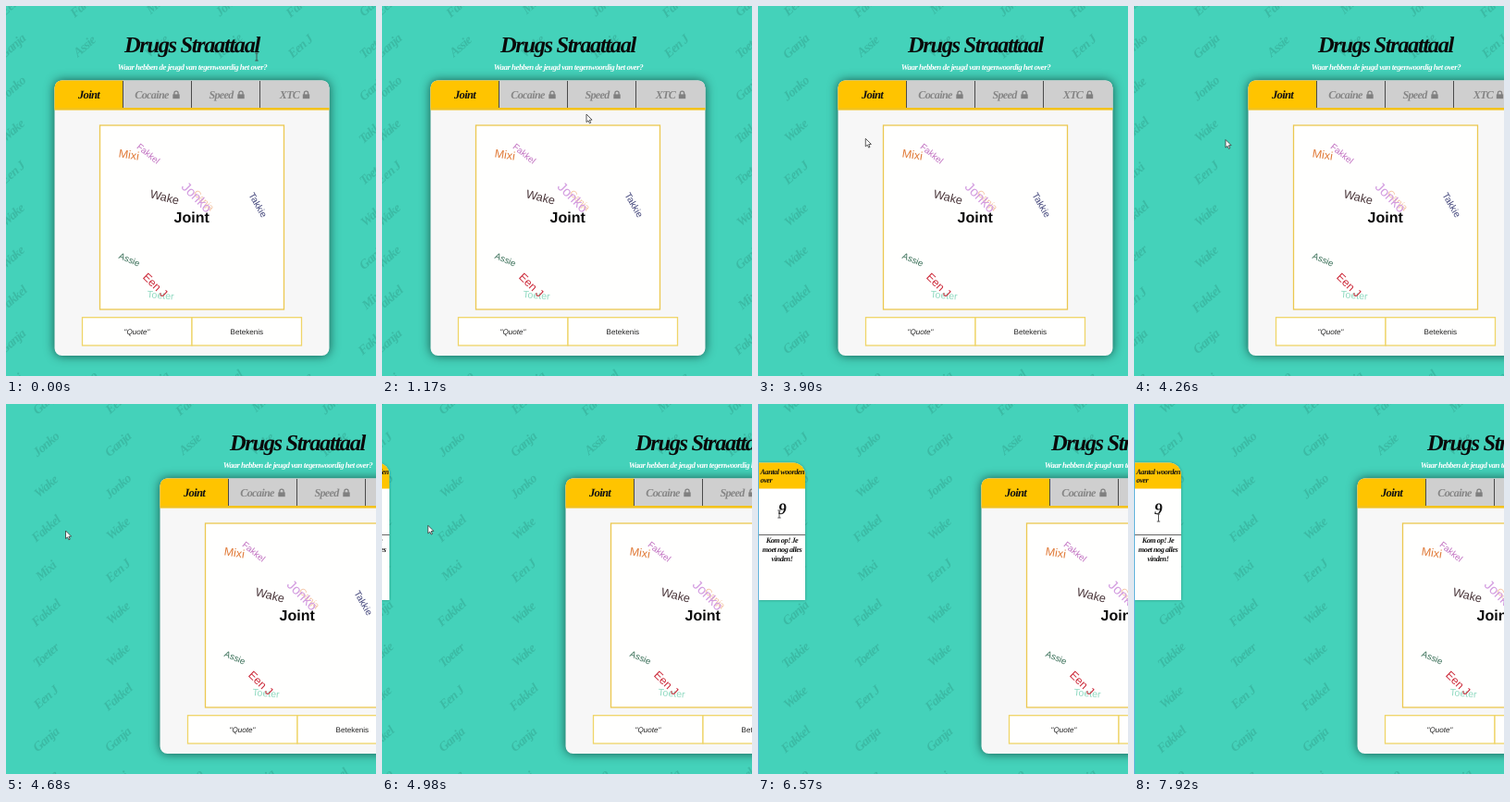
An HTML page with a canvas for the animation above (8000 ms loop, 400x400 px).

```html
<!DOCTYPE html>
<html lang="nl">
<head>
<meta charset="utf-8">
<title>Drugs Straattaal</title>
<style>
html, body { margin: 0; width: 100%; height: 100%; overflow: hidden; background: #44d2ba; }
canvas { display: block; width: 100vw; height: 100vh; }
</style>
</head>
<body>
<canvas id="stage"></canvas>
<script>
const LOOP = 8000, SIZE = 400;
const SCRIPT = "'Liberation Serif', serif";
const SANS = "'Liberation Sans', Arial, sans-serif";
const YELLOW = '#ffc400';
const canvas = document.getElementById('stage');
const ctx = canvas.getContext('2d');
const dpr = Math.max(1, window.devicePixelRatio || 1);
canvas.width = canvas.height = SIZE * dpr;
ctx.textRendering = 'geometricPrecision';

// Background words per column, top to bottom
const COLUMNS = [
  'Wake,Een J,Jonko,Wake,Mixi,Ganja,Takkie,Wake,Fakkel,Jonko',
  'Ganja,Jonko,Wake,Fakkel,Mixi,Fakkel,Toeter,Een J,Ganja,Wake',
  'Een J,Ganja,Jonko,Wake,Een J,Wake,Wake,Fakkel,Ganja,Mixi',
  'Fakkel,Assie,,,,,,,,Jonko',
  'Mixi,Wake,,,,,,,,Ganja',
  'Jonko,Takkie,,,,,,,,Fakkel',
  'Fakkel,Een J,,,,,,,,Wake',
  'Ganja,Toeter,Ganja,Takkie,Toeter,Wake,Ganja,Mixi,Fakkel,Jonko'
].map(c => c.split(','));

// text, x, y, degrees, size, colour
const CLOUD = [
  ['Ganja', 214, 210, 45, 10, '#f3c3a2'],
  ['Jonko', 206.5, 206.5, 45, 14.8, '#d39ce0'],
  ['Mixi', 133, 160.5, 9, 12.5, '#e07a38'],
  ['Fakkel', 154, 159.5, 39, 9.7, '#c06fc0'],
  ['Wake', 171.5, 206.5, 14, 12.7, '#493539'],
  ['Takkie', 272.5, 215, 60, 10.2, '#42457a'],
  ['Assie', 133.5, 274, 23, 9.6, '#356c54'],
  ['Toeter', 167, 312.5, 5, 10.5, '#8fd9c0'],
  ['Een J', 161.5, 301.5, 44, 12.2, '#cc2a3a']
];

// time, x, y of the mouse on screen
const PATH = [
  [0, 271, 55], [1170, 221, 117], [3510, 135, 142], [4260, 99, 144.5],
  [4680, 64.5, 137], [5280, 35, 125.5], [5400, 30, 122], [5670, 28.5, 121],
  [5940, 28.5, 121], [6120, 25, 118], [6480, 25, 118], [6570, 23, 119],
  [6750, 23, 119], [7200, 18.5, 111], [7560, 26, 109], [7920, 26.5, 123], [8000, 26.5, 123]
];

function pointerAt(t) {
  let i = 0;
  while (i < PATH.length - 2 && t >= PATH[i + 1][0]) i++;
  const [t0, x0, y0] = PATH[i], [t1, x1, y1] = PATH[i + 1];
  const k = (t - t0) / (t1 - t0);
  return [x0 + (x1 - x0) * k, y0 + (y1 - y0) * k];
}

const panAt = t => Math.round(Math.max(0, Math.min(189, (t - 3575) * 0.1036)));

function snap(t) {
  const step = t >= 3600 && t < 5400 ? 30 : 90;
  return Math.floor(t / step) * step;
}

function text(str, x, y, font, color, align = 'center') {
  ctx.font = font;
  ctx.fillStyle = color;
  ctx.textAlign = align;
  ctx.fillText(str, x, y);
}

// Tight bold italic, so the letters nearly join
function script(str, x, y, size, color, align) {
  ctx.letterSpacing = `${-0.055 * size}px`;
  text(str, x, y, `italic bold ${size}px ${SCRIPT}`, color, align);
  ctx.letterSpacing = '0px';
}

function sans(str, x, y, size, color, style = '') {
  text(str, x, y, `${style} ${size}px ${SANS}`, color);
}

function turned(write, str, x, y, deg, size, color) {
  ctx.save();
  ctx.translate(x, y);
  ctx.rotate(deg * Math.PI / 180);
  write(str, 0, size * 0.36, size, color);
  ctx.restore();
}

function rect(x, y, w, h, color) {
  ctx.fillStyle = color;
  ctx.fillRect(x, y, w, h);
}

function box(x, y, w, h, color) {
  rect(x, y, w, h, '#fffffe');
  ctx.strokeStyle = color;
  ctx.lineWidth = 1.3;
  ctx.strokeRect(x, y, w, h);
}

function rounded(x, y, w, h, radii, color) {
  ctx.beginPath();
  ctx.roundRect(x, y, w, h, radii);
  ctx.fillStyle = color;
  ctx.fill();
}

function shadow(blur, color) {
  ctx.shadowBlur = blur * dpr;
  ctx.shadowColor = color;
}

function lock(x, y) {
  rect(x - 3.7, y - 0.6, 7.4, 4.8, '#808080');
  ctx.beginPath();
  ctx.moveTo(x - 2.1, y);
  ctx.arc(x, y - 1.8, 2.1, Math.PI, 0);
  ctx.lineTo(x + 2.1, y);
  ctx.strokeStyle = '#808080';
  ctx.lineWidth = 1.3;
  ctx.stroke();
}

function backdrop() {
  COLUMNS.forEach((words, c) => words.forEach((word, r) => {
    if (word) turned(script, word, -149 + c * 77.8, -2.5 + r * 45.6, -41, 14, '#3bbaa4');
  }));
}

function card() {
  ctx.save();
  shadow(11, 'rgba(0,30,25,.7)');
  rounded(52.5, 80.5, 297, 297.5, 8, '#f7f7f7');
  ctx.restore();

  rounded(52.5, 80.5, 297, 30, [8, 8, 0, 0], '#cfcfcf');
  rounded(52.5, 80.5, 74, 30, [8, 0, 0, 0], YELLOW);
  for (const x of [126, 200, 274]) rect(x, 81, 1, 29, '#4a4a4a');
  rect(52.5, 110, 297, 2.6, '#f3c21c');
  script('Joint', 89.5, 100.3, 12.6, '#111');
  const tabs = [['Cocaine', 157.5, 184], ['Speed', 232.5, 254], ['XTC', 306.5, 324.5]];
  for (const [name, x, lx] of tabs) {
    script(name, x, 100.3, 12.1, '#858585');
    lock(lx, 96);
  }

  box(101.5, 129, 199, 199, '#ecc850');
  for (const [word, x, y, deg, size, color] of CLOUD)
    turned(sans, word, x, y, deg, size, color);
  sans('Joint', 200.7, 234.3, 16, '#0c0c0c', 'bold');

  box(82.5, 336.7, 118.5, 30.3, '#efd568');
  box(201, 336.7, 118.5, 30.3, '#efd568');
  sans('"Quote"', 141.5, 354.5, 8.1, '#222', 'italic');
  sans('Betekenis', 260.3, 354.5, 8.1, '#222');
}

function counter() {
  const x = -188, mid = x + 25;
  ctx.save();
  shadow(3, 'rgba(0,40,30,.4)');
  rounded(x, 63.5, 50, 148.5, [0, 13, 0, 0], '#fffffe');
  ctx.restore();
  rounded(x, 63.5, 50, 28, [0, 13, 0, 0], YELLOW);
  script('Aantal woorden', x + 1.5, 75.7, 8.2, '#111', 'left');
  script('over', x + 1.5, 84.7, 8.2, '#111', 'left');
  script('9', mid, 118.8, 17.5, '#111');
  rect(x, 141, 50, 1, '#666');
  ['Kom op! Je', 'moet nog alles', 'vinden!'].forEach((line, i) =>
    script(line, mid, 150 + i * 10, 8.2, '#111'));
  rect(x - 10, 0, 10, SIZE, '#62b4dc');
}

function arrow(x, y) {
  ctx.beginPath();
  ctx.moveTo(x, y);
  for (const [dx, dy] of [[0, 8.6], [2, 6.9], [3.4, 9.8], [4.7, 9.2], [3.4, 6.3], [6.1, 6.1]])
    ctx.lineTo(x + dx, y + dy);
  ctx.closePath();
  ctx.fillStyle = '#fff';
  ctx.fill();
  ctx.strokeStyle = '#333';
  ctx.lineWidth = 0.8;
  ctx.stroke();
}

function beam(x, y) {
  ctx.beginPath();
  for (const s of [-1, 1]) {
    ctx.moveTo(x - 1.7, y + s * 4);
    ctx.lineTo(x + 1.7, y + s * 4);
  }
  ctx.moveTo(x, y - 4);
  ctx.lineTo(x, y + 4);
  ctx.strokeStyle = '#444';
  ctx.lineWidth = 0.9;
  ctx.stroke();
}

function draw(time) {
  const t = snap(time);
  ctx.setTransform(dpr, 0, 0, dpr, 0, 0);
  rect(0, 0, SIZE, SIZE, '#44d2ba');
  ctx.save();
  ctx.translate(panAt(t), 0);
  backdrop();
  script('Drugs Straattaal', 201, 50, 24.4, '#0a0a0a');
  script('Waar hebben de jeugd van tegenwoordig het over?', 201.5, 69, 8.9, '#fff');
  card();
  counter();
  ctx.restore();
  const [x, y] = pointerAt(t);
  (t < 330 || t >= 6030 ? beam : arrow)(x, y);
}

const start = performance.now();
function tick() {
  draw((performance.now() - start) % LOOP);
  requestAnimationFrame(tick);
}
tick();
</script>
</body>
</html>
```
